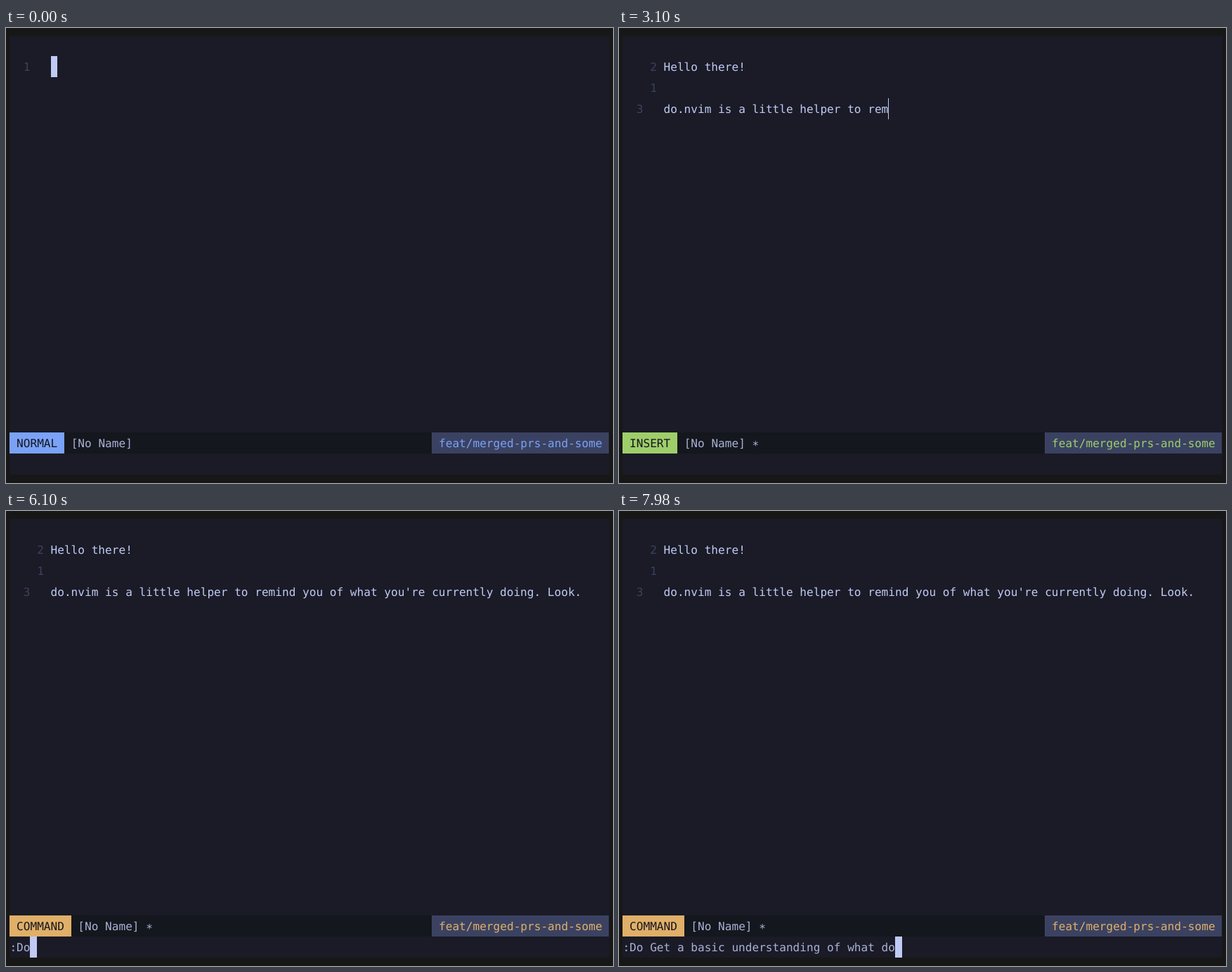
Animation, 864 px wide and 648 px high, one loop 8 s. Source, as an HTML page:

```html
<!DOCTYPE html>
<html lang="en">
<head>
<meta charset="utf-8">
<title>Editor session</title>
<style>
  html, body { margin: 0; width: 100%; height: 100%; overflow: hidden; background: #171717; }
  svg { display: block; width: 864px; height: 648px; }
  text {
    font: 16.1px "DejaVu Sans Mono", "Noto Sans Mono", monospace;
    text-rendering: geometricPrecision;
    font-variant-ligatures: none;
    white-space: pre;
    fill: #c0caf5;
  }
  .num { fill: #3b4261; }
  .soft { fill: #a9b1d6; }
  .label { fill: #15161e; }
</style>
</head>
<body>
<svg id="stage" viewBox="0 0 864 648"></svg>
<script>
const LOOP = 8000, CELL = 9.693, ROW = 29.76, LEFT = 5.4, TOP = 10.6;
const GUTTER = 6, STATUS = 19, PROMPT = 20;
const COLORS = { NORMAL: '#7aa2f7', INSERT: '#9ece6a', COMMAND: '#e0af68' };

const HEAD = 'Hello there!';
const BODY = "do.nvim is a little helper to remind you of what you're currently doing. Look.";
const COMMAND = ':Do Get a basic understanding of what do';

// [time, characters typed]; keystrokes are evenly spaced in between
const HEAD_KEYS = [[480, 0], [960, 9], [1120, 12]];
const BODY_KEYS = [[1360, 0], [2060, 13], [2160, 15], [2220, 16], [3040, 32], [3100, 33],
  [3820, 47], [3880, 48], [4700, 64], [5120, 72], [5400, 73], [5660, 78]];
const COMMAND_KEYS = [[5980, 1], [6740, 16], [6780, 17], [7560, 32], [7640, 33], [7980, 40]];

// [time, mode, cursor row]
const STATES = [[0, 'NORMAL', 1], [480, 'INSERT', 1], [1180, 'INSERT', 2], [1240, 'NORMAL', 2],
  [1360, 'INSERT', 3], [5960, 'NORMAL', 3], [5980, 'COMMAND', 3]];

const stage = document.getElementById('stage');
const colX = c => LEFT + c * CELL;
const rowY = r => Math.round(TOP + r * ROW);

function add(tag, attrs) {
  const el = document.createElementNS('http://www.w3.org/2000/svg', tag);
  for (const key in attrs) el.setAttribute(key, attrs[key]);
  return stage.appendChild(el);
}

function place(el, col, row, cols) {
  const x = Math.round(colX(col));
  el.setAttribute('x', x);
  el.setAttribute('y', rowY(row));
  el.setAttribute('width', Math.round(colX(col + cols)) - x);
  el.setAttribute('height', rowY(row + 1) - rowY(row));
}

function box(col, row, cols, fill) {
  const el = add('rect', { fill });
  place(el, col, row, cols);
  return el;
}

function label(col, row, kind, str = '') {
  const el = add('text', { x: colX(col), y: rowY(row) + 21, class: kind });
  el.textContent = str;
  return el;
}

add('rect', { x: 5, y: 11, width: 854, height: 625, fill: '#1a1b26' });
box(0, STATUS, 88, '#14171d');
const modeBox = box(0, STATUS, 8, COLORS.NORMAL);
box(62, STATUS, 26, '#3b4261');
const cursor = box(GUTTER, 1, 1, '#c0caf5');

const numbers = [1, 2, 3].map(row => label(2, row, 'num'));
const head = label(GUTTER, 1, '');
const body = label(GUTTER, 3, '');
const prompt = label(0, PROMPT, 'soft');
const modeText = label(1, STATUS, 'label');
const file = label(9, STATUS, 'soft', '[No Name]');
const star = label(19, STATUS, 'soft', '*');
star.setAttribute('dy', 3);
const branch = label(63, STATUS, '', 'feat/merged-prs-and-some');

function typed(keys, t) {
  if (t < keys[0][0]) return 0;
  for (let i = 1; i < keys.length; i++) {
    const [t0, n0] = keys[i - 1], [t1, n1] = keys[i];
    if (t < t1) return Math.floor(n0 + (n1 - n0) * (t - t0) / (t1 - t0) + 1e-6);
  }
  return keys[keys.length - 1][1];
}

function setText(el, str) {
  if (el.textContent !== str) el.textContent = str;
}

function drawNumbers(current) {
  numbers.forEach((el, i) => {
    const row = i + 1;
    setText(el, row > current ? '' : String(row === current ? row : current - row));
    el.setAttribute('x', colX(row === current ? 2 : 4));
  });
}

function drawStatus(mode, changed) {
  const end = mode.length + 2;
  place(modeBox, 0, STATUS, end);
  modeBox.setAttribute('fill', COLORS[mode]);
  branch.style.fill = COLORS[mode];
  setText(modeText, mode);
  file.setAttribute('x', colX(end + 1));
  star.setAttribute('x', colX(end + 11));
  star.style.display = changed ? '' : 'none';
}

function drawCursor(mode, row, count) {
  if (mode === 'COMMAND') return place(cursor, count, PROMPT, 1);
  if (mode === 'NORMAL') return place(cursor, GUTTER + Math.max(0, count - 1), row, 1);
  place(cursor, GUTTER + count, row, 1);
  cursor.setAttribute('x', Math.round(colX(GUTTER + count) - 0.3));
  cursor.setAttribute('width', 1);
}

function draw(t) {
  const [, mode, row] = STATES.filter(s => s[0] <= t).pop();
  const h = typed(HEAD_KEYS, t), b = typed(BODY_KEYS, t), c = typed(COMMAND_KEYS, t);
  setText(head, HEAD.slice(0, h));
  setText(body, BODY.slice(0, b));
  setText(prompt, COMMAND.slice(0, c));
  drawNumbers(row);
  drawStatus(mode, h > 0);
  drawCursor(mode, row, mode === 'COMMAND' ? c : [h, 0, b][row - 1]);
}

const start = performance.now();
function tick() {
  draw((performance.now() - start) % LOOP);
  requestAnimationFrame(tick);
}
tick();
</script>
</body>
</html>
```
